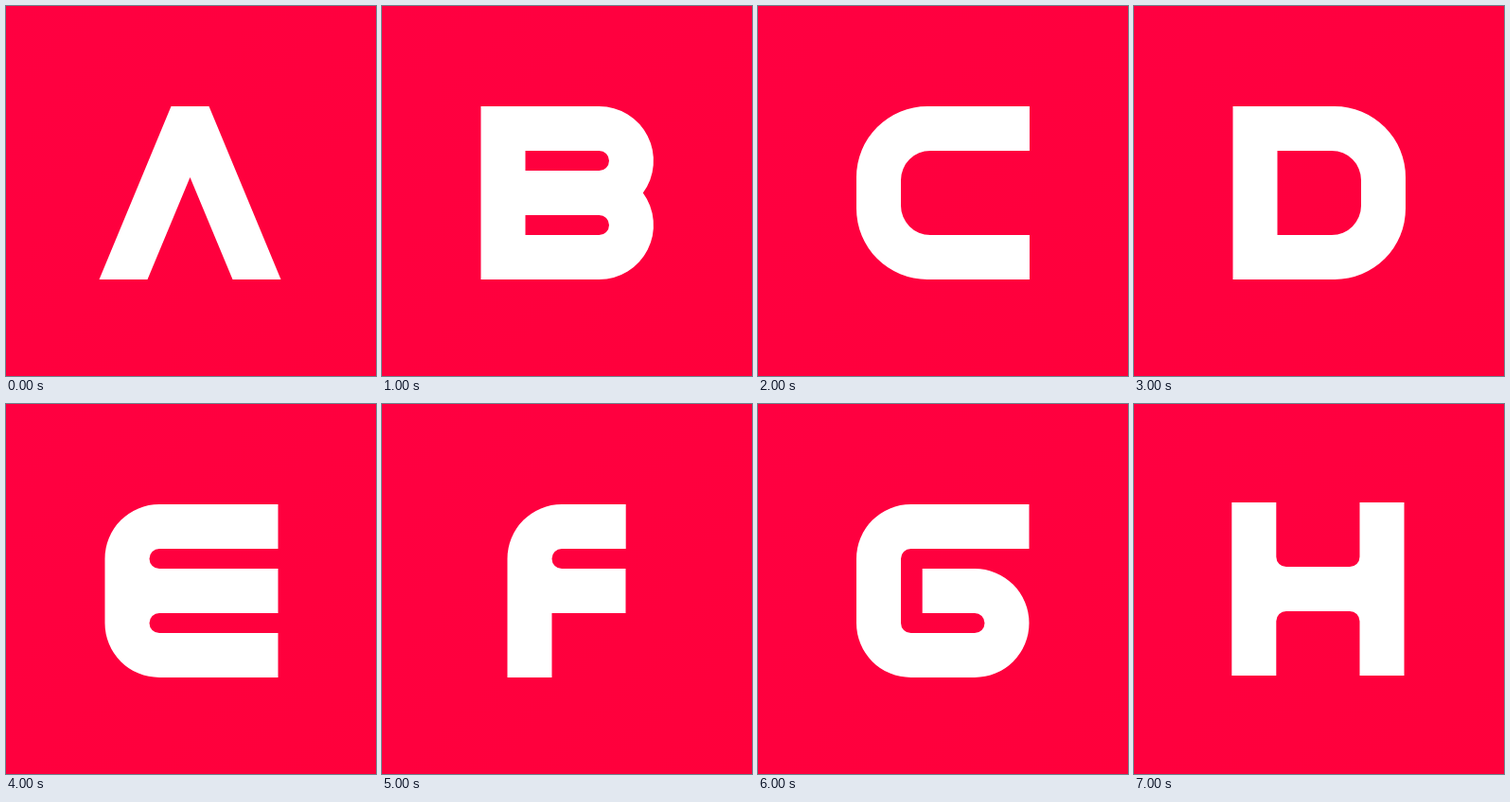
These frames come from a looping animation (391x391 px, 8 s). An HTML page with a canvas:

```html
<!DOCTYPE html>
<html lang="en">
<head>
<meta charset="utf-8">
<title>Alphabet</title>
<style>
  html, body { margin: 0; width: 100%; height: 100%; overflow: hidden; background: #ff003e; }
  canvas { display: block; width: 391px; height: 391px; }
</style>
</head>
<body>
<canvas id="stage" width="391" height="391"></canvas>
<script>
const SIZE = 391;
const HOLD = 1000;
const ctx = document.getElementById('stage').getContext('2d');

// One outline per letter, shown in alphabetical order.
const letters = [
  // A
  'M174.5 106H214.5L290.5 289H239.5L194.5 181L149.5 289H98.5Z',
  // B
  'M104.5 106H229.5A57.5 57.5 0 0 1 275.8 197.5A57.5 57.5 0 0 1 229.5 289H104.5Z' +
  'M151.5 153V174H229.5A10.5 10.5 0 0 0 229.5 153Z' +
  'M151.5 221V242H229.5A10.5 10.5 0 0 0 229.5 221Z',
  // C
  'M287 106H179A75 75 0 0 0 104 181V214A75 75 0 0 0 179 289H287V242H182' +
  'A31 31 0 0 1 151 211V184A31 31 0 0 1 182 153H287Z',
  // D
  'M104.5 106H212A75 75 0 0 1 287 181V214A75 75 0 0 1 212 289H104.5Z' +
  'M151.5 153V242H209A31 31 0 0 0 240 211V184A31 31 0 0 0 209 153Z',
  // E
  'M287.5 106H162A57.5 57.5 0 0 0 104.5 163.5V231.5A57.5 57.5 0 0 0 162 289H287.5V242' +
  'H162A10.5 10.5 0 0 1 162 221H287.5V174H162A10.5 10.5 0 0 1 162 153H287.5Z',
  // F
  'M257.7 106H190A57.5 57.5 0 0 0 132.5 163.5V289H179.5V221H257.5V174' +
  'H190A10.5 10.5 0 0 1 190 153H257.7Z',
  // G
  'M286.5 106H161.5A57.5 57.5 0 0 0 104 163.5V231.5A57.5 57.5 0 0 0 161.5 289H229' +
  'A57.5 57.5 0 0 0 229 174H173.7V221H229A10.5 10.5 0 0 1 229 242H161.5' +
  'A10.5 10.5 0 0 1 151 231.5V163.5A10.5 10.5 0 0 1 161.5 153H286.5Z',
  // H
  'M103.3 104H150.3V161.5A10.5 10.5 0 0 0 160.8 172H228A10.5 10.5 0 0 0 238.5 161.5V104' +
  'H285.5V287H238.5V229.5A10.5 10.5 0 0 0 228 219H160.8A10.5 10.5 0 0 0 150.3 229.5V287H103.3Z'
].map(d => new Path2D(d));

const backdrop = ctx.createLinearGradient(0, 0, SIZE, SIZE);
backdrop.addColorStop(0, '#ff0041');
backdrop.addColorStop(1, '#ff003b');

function draw(time) {
  const index = Math.floor(time / HOLD) % letters.length;
  ctx.fillStyle = backdrop;
  ctx.fillRect(0, 0, SIZE, SIZE);
  ctx.fillStyle = '#fff';
  ctx.fill(letters[index], 'evenodd');
}

const start = performance.now();
function tick() {
  draw(performance.now() - start);
  requestAnimationFrame(tick);
}
tick();
</script>
</body>
</html>
```
